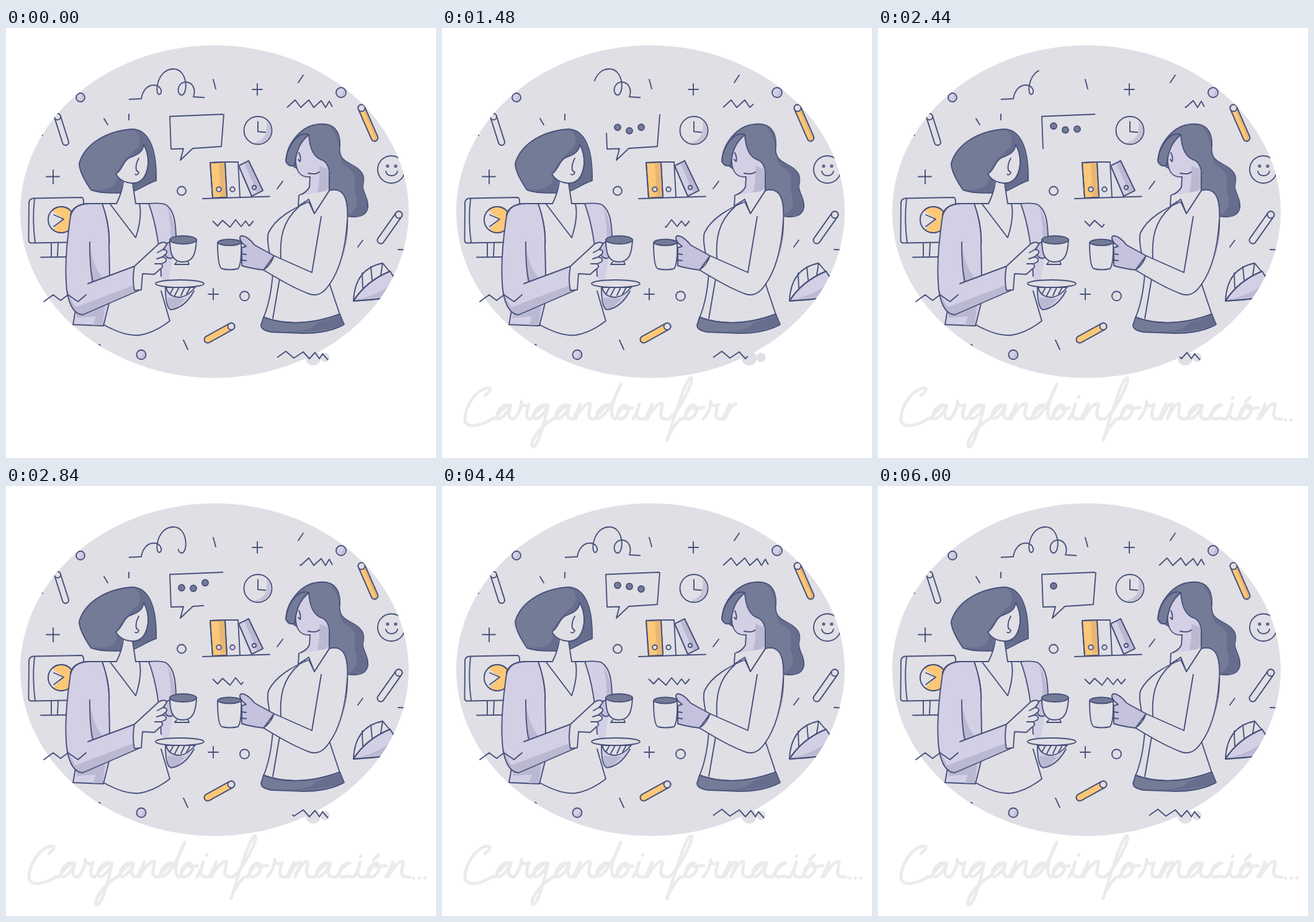
Write an HTML page that moves like this. It is 693x693 px and loops after 6040 ms.

```html
<!DOCTYPE html>
<html lang="es">
<head>
<meta charset="utf-8">
<title>Cargando información...</title>
<style>
  html, body { margin: 0; height: 100%; overflow: hidden; background: #fff; }
  svg { display: block; width: 100vw; height: 100vh; }
  .line { fill: none; stroke: #48517a; stroke-width: 1.9; stroke-linecap: round; stroke-linejoin: round; }
  .bg { fill: #e0dfe6; }
  .lav { fill: #d3cfe5; }
  .hand { fill: #c6c1dc; }
  .shade { fill: #bbb8d2; stroke: none; }
  .dark { fill: #737b97; }
  .deep { fill: #666d8d; stroke: none; }
  .gold { fill: #fcc877; }
  .amber { fill: #e8b673; stroke: none; }
  #script path { fill: none; stroke: #ebebeb; stroke-width: 5; stroke-linecap: round; stroke-linejoin: round; }
  #squiggles path { stroke-linecap: butt; }
</style>
</head>
<body>
<svg viewBox="0 0 693 693">
  <defs>
    <clipPath id="oval"><ellipse cx="336" cy="296" rx="313" ry="268"/></clipPath>
    <pattern id="grain" width="17" height="17" patternUnits="userSpaceOnUse">
      <path d="M2 3h1M9 1h1M14 5h1M6 8h1M11 10h1M2 13h1M15 14h1M8 15h1" stroke="#c6c6d3"/>
    </pattern>
  </defs>

  <g class="bg">
    <ellipse cx="336" cy="296" rx="313" ry="268"/>
    <circle cx="495" cy="532" r="12"/><circle cx="514" cy="531" r="7.500"/>
  </g>

  <g clip-path="url(#oval)">
    <!-- stippled shadows -->
    <g fill="none" stroke="url(#grain)" stroke-width="18" transform="translate(4 3)">
      <path d="M118 218Q155 160 215 164Q243 175 242 246L225 283H255Q274 300 274 335L280 440 264 472Q215 515 157 479H108L97 400 104 300 160 270Z"/>
      <path d="M451 215Q460 160 505 155 540 155 538 195L575 235 583 295 550 304 520 420 545 480 480 492 411 480 430 400 423 330 480 250Z"/>
    </g>

    <!-- background objects -->
    <g class="line">
      <path class="bg" d="M44 274.500L122 273Q125 274 125 280V345L40 346.500Q36 346 36.500 340L37 281Q38 275 44 274.500ZM46 275Q42 310 47 346M73 346V368M84 346L83 368M56 369.500L98 369"/>
      <circle class="gold" cx="89" cy="309" r="21"/>
      <path class="bg" d="M74 294L93 308 76 325Q60 310 74 294Z" stroke="none"/>
      <path d="M77 301L93 308 77 320"/>
      <circle cx="89" cy="309" r="21"/>

      <circle cx="406" cy="165" r="22.500"/>
      <path class="shade" d="M420 149Q435 166 420 181 410 188 400 185 424 180 420 149Z" opacity=".7"/>
      <path d="M406 151V167L418 168"/>

      <path class="gold" d="M329 217L353 216 356 273 333 274Z"/>
      <path class="amber" d="M343 217H352L355 272H346Z"/>
      <path d="M329 217L353 216 356 273 333 274ZM353 216H374L377 272"/>
      <path class="lav" d="M375 222L391 214 414 262 396 271Z"/>
      <path class="shade" d="M384 218L391 215 413 262 405 266Z"/>
      <path d="M375 222L391 214 414 262 396 271ZM317 275L425 271.500"/>
      <g class="bg"><circle cx="343" cy="260" r="3.800"/><circle cx="365" cy="260" r="3.800"/></g>
      <circle cx="400" cy="257" r="3.200"/>

      <circle cx="621" cy="228" r="22"/>
      <circle cx="615" cy="222.500" r="1.600"/><circle cx="628" cy="222.500" r="1.600"/>
      <path d="M612 231Q614 238 621 238 629 238 631 231"/>

      <path d="M560 440Q562 388 607 379L628 404"/>
      <path class="lav" d="M560 440Q580 408 619 392L630 410 618 434 590 438Z"/>
      <path class="shade" d="M563 438Q605 430 626 407L618 432Z"/>
      <path d="M560 440Q580 408 619 392M575 419L574 395M590 406L588 385M604 398L607 379M560 440L606 436"/>

      <g class="lav"><circle cx="120" cy="112" r="7"/><circle cx="540" cy="104" r="8"/><circle cx="218" cy="526.500" r="7.500"/></g>
      <path class="shade" d="M123 106Q128 113 117 118 124 113 123 106ZM544 98Q550 107 537 111 545 106 544 98ZM222 521Q228 530 215 533 223 528 222 521Z"/>
      <circle cx="283" cy="262.500" r="7"/><circle cx="384.500" cy="432" r="7.500"/>
      <path d="M397 99H413M405 90V108M65 239.500H86M76 229V251M326 429H342M334 420V438"/>
      <path d="M334 83L338 98M479 76L471 88M198 139V148M158 146L164 156M446 247L437 259M575 342L567 353M286 503L293 518M632 357L643 357.500M150 510L152 511M58 172L59 173"/>
    </g>
    <g id="pens"></g>
  </g>

  <!-- left figure -->
  <g class="line">
    <path class="bg" d="M135 283H255L250 400 264 472C250 483 235 492 215 495 195 497 175 488 157 478L160 300Z" stroke="none"/>
    <path class="lav" d="M230 283Q250 281 258 285C272 295 273 315 274 335L268 376 262 408 303 424C297 437 288 449 275 453 263 456 258 450 257 418L250 400C248 350 240 310 230 283Z" stroke="none"/>
    <path class="shade" d="M260 290Q270 305 273 335L268 360H262Q270 330 260 290ZM260 435L290 436 274 452 261 452Z"/>
    <path d="M209 283H230Q250 281 258 285C272 295 273 315 274 335M257 418Q257 452 266 454C282 452 294 440 303 424"/>
    <path class="lav" d="M155 283Q168 320 166 350L167 440 157 480 108 478 112 455 104 300Q110 283 135 283Z"/>
    <path class="shade" d="M114 459L160 445 156 478 140 479 145 465 114 467Z"/>
    <path class="lav" d="M155 283H135C112 283 104 295 103 310 98 345 95 380 97 410 98 440 108 462 124 462L214 423 207 384 166 399Q168 320 155 283Z" stroke="none"/>
    <path class="shade" d="M134 345Q140 385 155 402L137 409ZM98 418Q104 440 112 450L210 413 213 422 124 461Q100 458 98 418Z"/>
    <path d="M178 283H135C112 283 104 295 103 310 98 345 95 380 97 410 98 440 108 462 124 462L214 423M155 283Q168 320 166 350L167 397M135 345Q135 390 140 408M132 412L207 384M168 284L209 338Q220 305 215 283M230 283C240 310 248 350 250 400M250 424L264 472C250 483 235 492 215 495 195 497 175 488 157 478"/>

    <path class="dark" d="M118 218C128 185 165 165 205 163 228 165 243 190 242 246 228 249 213 264 195 265 168 267 148 265 137 261 126 245 118 230 118 218Z"/>
    <path class="deep" d="M140 260Q185 264 178 232 190 210 213 192 221 172 205 164 240 170 241 245L196 264Q165 267 140 260Z"/>
    <path class="bg" d="M188 244Q187 265 178 283H209L204 248Z" stroke="none"/>
    <path d="M189 248Q187 265 178 283M204 250L209 283"/>
    <path class="bg" d="M222 188Q230 202 229 220C226 242 217 250 205 250 192 250 182 244 177 235 188 229 187 216 199 209 213 204 220 200 222 188Z"/>
    <path d="M214 210Q208 221 210 229L214 233Q212 238 208 236"/>

    <path class="hand" d="M264 345Q252 348 256 365 261 374 269 370Z"/>
    <path class="bg" d="M264 341C264 363 268 377 285 377 302 377 306 363 307 341ZM275 377L272 381H295L293 376"/>
    <ellipse class="dark" cx="285.500" cy="341.500" rx="21.500" ry="6.500"/>
    <path class="bg" d="M207 384L246 348Q257 342 259 349L253 357Q262 358 258 364L252 369Q261 371 257 377L250 380Q255 385 249 388L239 397 220 396 218 422 207 423Q203 405 207 384Z"/>
    <path d="M244 362L253 357M243 372L252 369M240 380L250 380"/>
    <path class="bg" d="M258 418Q262 434 280 434 292 433 305 418Z"/>
    <path d="M270 418L264 429M279 418L272 431M288 418L282 431M297 418L291 429"/>
    <ellipse class="bg" cx="280" cy="412" rx="39" ry="6"/>
    <path d="M61 441L76 430 88 439 100 430 116 441 129 430"/>
  </g>

  <!-- right figure -->
  <g class="line">
    <path class="dark" d="M451 215C452 187 475 157 505 155 530 153 539 168 538 190 535 211 548 215 560 222 580 233 577 245 575 255 575 267 585 275 583 290 580 304 565 306 550 303L521 262 490 240Z"/>
    <path class="deep" d="M522 160C545 180 530 210 548 224 570 235 560 250 562 264 570 285 565 295 550 302L570 304Q588 295 580 278 573 265 576 252 580 232 556 220 535 212 537 190 540 166 522 160Z"/>
    <path class="lav" d="M488 172C473 183 465 200 467 218 469 234 476 241 490 240L489 256Q485 265 472 270L495 298 521 262 521 240Q522 219 510 213 490 207 488 172Z"/>
    <path class="shade" d="M505 222L520 228V258L495 280Q507 260 505 222Z"/>
    <path class="dark" d="M451 215C453 190 471 165 488 172 472 185 468 200 465 221Q456 225 451 215Z"/>
    <path d="M472 201Q476 209 474 215L471 212M487 234Q499 237 505 232"/>
    <path class="bg" d="M488 280C465 290 435 305 423 330 418 345 430 380 430 395 428 425 422 450 415 467Q470 485 538 462L520 408C548 375 552 330 550 290 548 263 535 258 521 262L497 299Z"/>
    <path class="bg" d="M472 270L471 287 488 276 497 299 521 262"/>
    <path d="M472 288C445 312 441 340 443 372M441 404L430 468"/>
    <path class="dark" d="M415 466Q470 486 538 461L545 478Q520 492 480 492L427 490Q411 487 411 479Z"/>
    <path class="deep" d="M500 476L538 464 544 478Q510 492 440 490 495 490 500 476Z"/>
    <path class="bg" d="M341 346Q341 385 348 388 360 391 374 388 380 380 379 346Z"/>
    <ellipse class="dark" cx="360" cy="345.500" rx="18.500" ry="5"/>
    <path class="hand" d="M432 367L401 350Q388 334 379 335 374 338 381 347L387 352 380 354V383Q392 387 415 390Z"/>
    <path d="M380 364L387 365M380 374L387 375"/>
    <path class="bg" d="M508 304L493 394 432 367Q427 382 415 390C440 405 465 420 490 429Q507 434 520 415 546 380 549 330" stroke="none"/>
    <path d="M508 304L493 394 432 367Q427 382 415 390C440 405 465 420 490 429Q507 434 520 415 546 380 550 310"/>
  </g>

  <g id="squiggles" class="line">
    <path pathLength="100" d="M198 115L218 114C220 101 228 92 238 92 251 92 253 106 247 107 239 107 243 66 270 66 292 66 294 104 284 108 275 109 274 88 290 87 302 88 306 100 302 111L320 112"/>
    <path pathLength="100" d="M350 139L264 142.500 266 195 286 194.500 281 213 301 194 347 191 351 139"/>
    <path pathLength="100" d="M526 127L521 118 515 128 508 117 496 128 488 116 475 128 466 116 453 128"/>
    <path pathLength="100" d="M333 311L341 319 349 310 361 321 370 309 379 320 386 311 392 319 399 311"/>
    <path pathLength="100" d="M519 535L510 525 505 533 498 523 489 533 479 522 464 532 451 521 437 531"/>
  </g>

  <g id="dots" class="line dark">
    <circle cx="283" r="5"/><circle cx="302" r="5"/><circle cx="321" r="5"/>
  </g>

  <g id="script" role="img" aria-label="Cargando información...">
    <g id="letters"></g>
    <g id="marks">
      <path d="M323 595l1 -1"/><path d="M571 597l1 -1"/><path d="M592 603l8 -8"/>
      <path d="M657 632h.1"/><path d="M666 632h.1"/><path d="M675 632h.1"/>
    </g>
  </g>
</svg>
<script>
const LOOP = 6040;
const $ = id => document.getElementById(id);
const clamp = v => Math.min(1, Math.max(0, v));
const span = (t, from, to) => clamp((t - from) / (to - from));

// Pens: a round-capped bar with an open end
function pen(x1, y1, x2, y2, w, fill, shade) {
  const bar = (color, width, dx = 0) =>
    `<path d="M${x1 + dx} ${y1}L${x2 + dx} ${y2}" stroke="${color}" stroke-width="${width}" stroke-linecap="round"/>`;
  return bar('#48517a', w + 2) + bar(shade, w - 2) + bar(fill, w - 6, -1.5) +
    `<circle class="line bg" style="fill:#e0dfe6" cx="${x1}" cy="${y1}" r="${w / 2}"/>`;
}
$('pens').innerHTML =
  pen(83, 143, 96, 184, 10, '#e0dfe6', '#e0dfe6') +
  pen(573, 129, 594, 177, 11, '#fcc877', '#e8b673') +
  pen(633, 301, 604, 342, 11, '#e0dfe6', '#e0dfe6') +
  pen(363, 481, 325, 502, 11, '#fcc877', '#fcc877');

// Script letters: advance width and a stroke starting on the baseline
const bowl = 'c6-8 16-22 24-22c-10-4-22 10-20 20';
const stem = 'c4-6 10-20 12-24c-2 8-6 18-8 24';
const glyphs = {
  C: [50, 'm35-38c13-9 10-15-2-10c-19 8-31 35-30 50c3 14 25 10 45-3'],
  a: [30, bowl + 'c4 6 16-6 22-20c-4 12-6 22 4 22'],
  c: [24, 'c6-8 14-22 22-22c-12-4-24 22-12 22c5 0 10-3 14 0'],
  d: [32, bowl + 'c6 6 26-20 38-54c-12 24-20 50-10 56'],
  f: [18, 'c16-12 40-60 36-66c-8-4-30 70-38 98c-4 10 0-10 20-32'],
  g: [36, 'c6-8 18-22 26-22c-10-4-24 10-20 20c4 6 16-6 22-20c-6 28-16 64-24 67c-8-4 8-31 32-45'],
  i: [14, 'c4-6 8-16 10-24c-4 12-8 24 4 24'],
  m: [40, stem + 'c6-14 14-26 18-24c2 4-6 16-8 24c6-14 16-28 20-24c2 4-8 24 6 24'],
  n: [34, stem + 'c8-16 20-28 24-24c2 4-10 24 6 24'],
  o: [27, 'c6-10 12-22 18-22c-12-2-20 22-10 22c11 0 19-20 9-22c-5 4 2 9 11 4'],
  r: [26, 'c6-6 12-18 12-28c0 8 8 8 12 5c-4 12-6 23 2 23']
};
const penTime = x => 40 + (x - 34) * 3.28;
const letters = [];
function script(word, x, gap) {
  for (const ch of word) {
    const [width, stroke] = glyphs[ch];
    const el = document.createElementNS('http://www.w3.org/2000/svg', 'path');
    el.setAttribute('pathLength', 100);
    el.setAttribute('d', `M${x} 630${stroke}h${gap}`);
    $('letters').append(el);
    letters.push({ el, from: penTime(x), to: penTime(x + width + gap) });
    x += width + gap;
  }
}
script('Cargando', 34, 1);
script('informacion', 308, 5);

// Bounce phase of each dot, in turns
const beats = [0, 880, 2040, 2840, 3480, 4440, 6000, LOOP];
const turns = [
  [-.7, .18, 1.32, 2.32, 2.82, 3.77, 5.25, 5.29],
  [-1.2, -.32, 1, 1.65, 2.5, 3.27, 4.9, 4.94],
  [-1.2, -.29, .71, 1.875, 2.5, 3.375, 4.8, 4.84]
];
const fades = [[40, 240, LOOP, LOOP + 1], [440, 640, 5800, 5960], [840, 1040, 5400, 5600]];
const markTimes = [2100, 2180, 2260, 2340, 2420, 2500];
const squiggles = [...$('squiggles').children];
const dots = [...$('dots').children];
const marks = [...$('marks').children];
const show = (el, on) => el.style.visibility = on ? 'visible' : 'hidden';

function draw(t) {
  const gone = 100 * span(t, 0, 2060) ** 3;
  const back = 100 * (1 - (1 - span(t, 2020, 4310)) ** 3);
  for (const s of squiggles)
    s.style.strokeDasharray = `${back} ${Math.max(0, gone - back)} ${100 - gone} 100`;

  let k = 0;
  while (k < beats.length - 2 && t >= beats[k + 1]) k++;
  const u = span(t, beats[k], beats[k + 1]);
  dots.forEach((dot, i) => {
    const turn = turns[i][k] + (turns[i][k + 1] - turns[i][k]) * u;
    const [in0, in1, out0, out1] = fades[i];
    dot.setAttribute('cy', 161 - 7 * Math.cos(2 * Math.PI * turn));
    dot.style.opacity = span(t, in0, in1) * (1 - span(t, out0, out1));
  });

  for (const { el, from, to } of letters) {
    show(el, t > from);
    el.style.strokeDasharray = `${100 * span(t, from, to)} 200`;
  }
  marks.forEach((m, i) => show(m, t >= markTimes[i]));
}

const start = performance.now();
function tick() {
  draw((performance.now() - start) % LOOP);
  requestAnimationFrame(tick);
}
tick();
</script>
</body>
</html>
```
